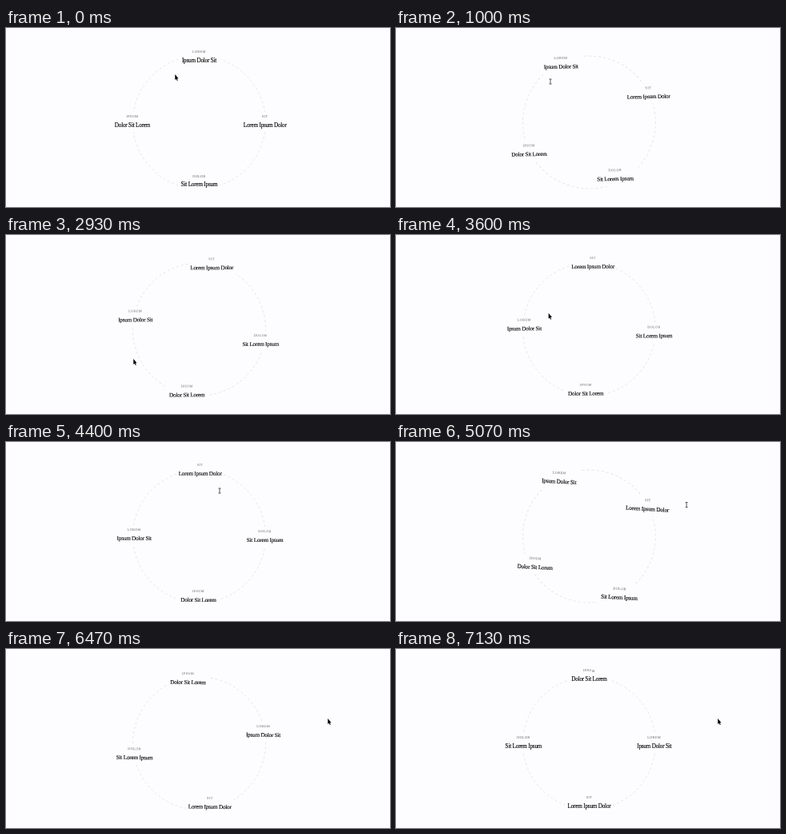
An HTML page that plays this animation: 480 by 224 pixels, repeating every 7270 ms.

```html
<!DOCTYPE html>
<html lang="en">
<head>
<meta charset="utf-8">
<title>Draggable ring</title>
<style>
  html, body { margin: 0; width: 100%; height: 100%; overflow: hidden; background: #fdfcfe; }
  svg { display: block; width: 480px; height: 224px; }
  text { font-family: "Liberation Serif", Tinos, serif; text-anchor: middle; }
  .label { font-size: 4.2px; letter-spacing: .45px; fill: #888; stroke: #888; stroke-width: .1px; }
  .title { font-size: 7.2px; letter-spacing: -.21px; fill: #000; stroke: #000; stroke-width: .12px; }
</style>
</head>
<body>
<svg viewBox="0 0 480 224">
  <circle id="ring" cx="241.5" cy="118" r="83" fill="none" stroke="#e4e4e7" stroke-width=".9" stroke-dasharray="3 3.02"/>
  <g id="items"></g>
  <path id="arrow" d="M-1.7 -4V3L-.2 1.7L.8 4L1.8 3.5L.8 1.3H2.6Z"/>
  <path id="beam" d="M-1.5 -3H1.5M0 -3V3M-1.5 3H1.5" fill="none" stroke="#333" stroke-width=".8"/>
</svg>
<script>
const LOOP = 7270, CX = 241.5, CY = 116;
const $ = id => document.getElementById(id);

// label, title, orbit radius; clockwise from the top
const items = [
  ["LOREM", "Ipsum Dolor Sit", 81.3],
  ["SIT", "Lorem Ipsum Dolor", 82.2],
  ["DOLOR", "Sit Lorem Ipsum", 82.1],
  ["IPSUM", "Dolor Sit Lorem", 83.5]
];

// [time, degrees]: drag back and settle, drag forward and settle
const spin = [[400, 0], [1000, -25.8], [1870, -63], [2070, -65], [2930, -79],
  [4070, -89.3], [4380, -89.3], [5300, 0], [5800, 56], [7130, 90]];

// [time, x, y]
const pointer = [[30, 213, 62], [300, 241, 62], [1000, 193, 67], [2070, 141.5, 142],
  [2930, 161, 159], [4070, 225, 64], [4400, 267, 61], [5600, 404, 91]];

const clamp = v => Math.max(0, Math.min(1, v));

// Monotone cubic through column c of the keys
function track(keys, t, c = 1) {
  const last = keys.length - 1;
  if (t <= keys[0][0]) return keys[0][c];
  if (t >= keys[last][0]) return keys[last][c];
  const slope = i => (keys[i + 1][c] - keys[i][c]) / (keys[i + 1][0] - keys[i][0]);
  const tangent = i => {
    if (i === 0 || i === last) return 0;
    const a = slope(i - 1), b = slope(i);
    return a * b > 0 ? 2 * a * b / (a + b) : 0;
  };
  const i = keys.findIndex(k => k[0] > t) - 1;
  const h = keys[i + 1][0] - keys[i][0], u = (t - keys[i][0]) / h, v = 1 - u;
  return v * v * (1 + 2 * u) * keys[i][c] + u * u * (3 - 2 * u) * keys[i + 1][c]
    + h * u * v * (v * tangent(i) - u * tangent(i + 1));
}

$("items").innerHTML = items.map(([label, title]) => {
  const w = title.length * 3.1 + 6;
  return `<g><rect x="${-w / 2}" y="-11" width="${w}" height="25" fill="#fdfcfe"/>
    <text class="label" y="-4">${label}</text>
    <text class="title" y="7.9">${title}</text></g>`;
}).join("");
const groups = [...$("items").children];

const place = (el, x, y, tilt = 0) =>
  el.setAttribute("transform", `translate(${x} ${y}) rotate(${tilt})`);

function draw(t) {
  const angle = track(spin, t);
  const tilt = angle - track(spin, t - 25);   // labels trail the ring slightly
  $("ring").setAttribute("transform", `rotate(${angle} 241.5 118)`);

  // The item resting at the bottom sits higher; the lift passes on as the ring settles.
  const first = t < 4200 ? clamp((-angle - 70) / 19) : 1;
  const second = clamp((angle - 60) / 29);
  const lift = [0, second, 1 - first, first - second];
  items.forEach(([, , orbit], i) => {
    const a = (angle + i * 90) * Math.PI / 180, r = orbit - 7.5 * lift[i];
    place(groups[i], CX + r * Math.sin(a), CY - r * Math.cos(a), tilt);
  });

  const dragging = t >= 470 && t < 2600 || t >= 4130 && t < 5300;
  const x = track(pointer, t), y = track(pointer, t, 2);
  for (const id of ["arrow", "beam"]) {
    place($(id), x, y);
    $(id).style.display = (id === "beam") === dragging ? "" : "none";
  }
}

let start;
function tick(now) {
  start ??= now;
  draw((now - start) % LOOP);
  requestAnimationFrame(tick);
}
draw(0);
requestAnimationFrame(tick);
</script>
</body>
</html>
```
